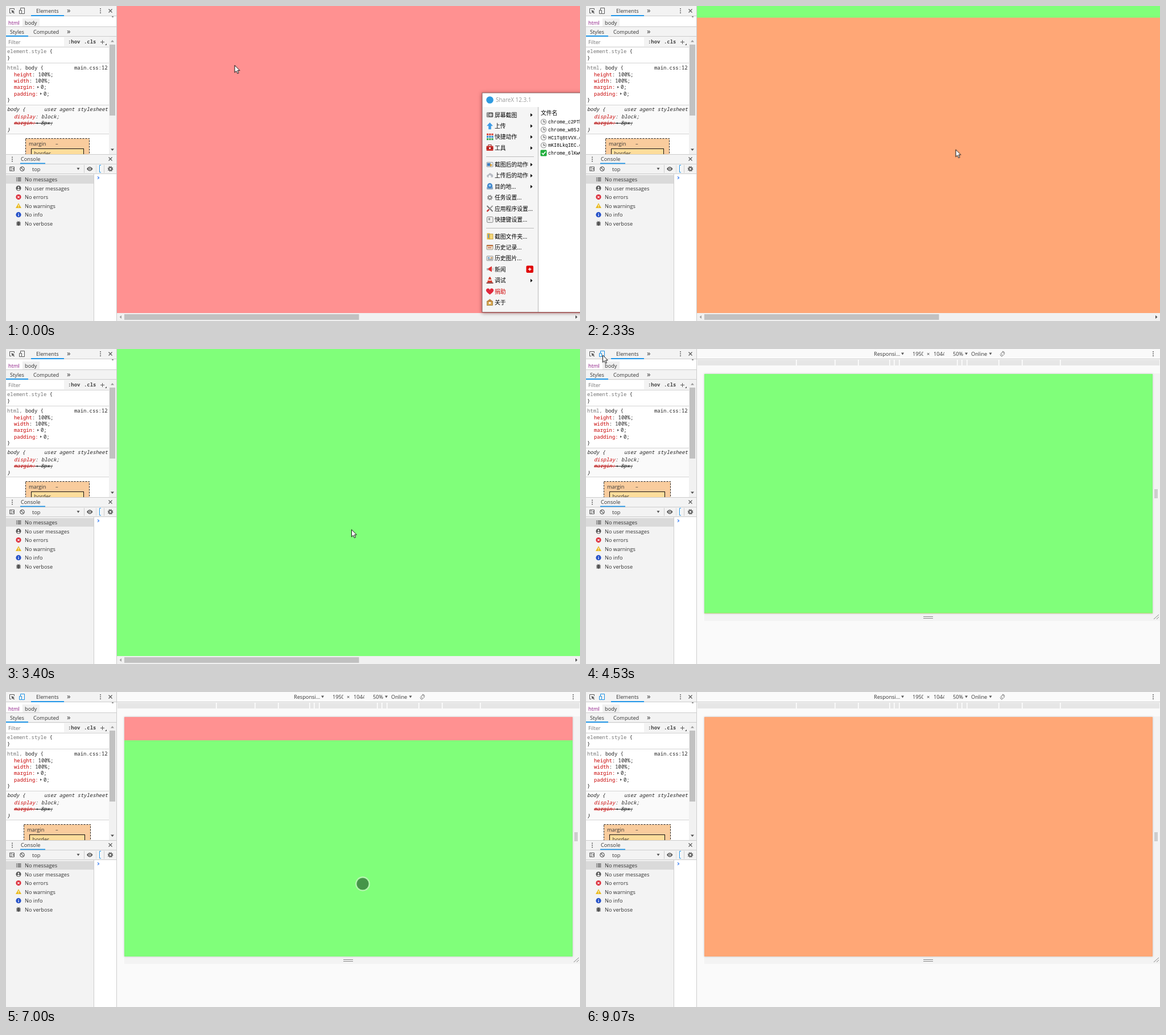
Write an HTML page that moves like this. It is 1009 by 555 pixels and loops after 9940 ms.

```html
<!DOCTYPE html>
<html lang="en">
<head>
<meta charset="utf-8">
<title>Page scroller demo</title>
<style>
html, body { margin: 0; width: 100%; height: 100%; overflow: hidden; background: #fff; }
#stage { position: relative; width: 1009px; height: 555px; overflow: hidden; }
#stage > svg { position: absolute; left: 0; top: 0; }
text { font: 9.2px "Open Sans", sans-serif; fill: #333; white-space: pre; }
.code text { font: 8.9px "Noto Sans Mono", monospace; fill: #222; }
.code .it { font-style: italic; }
.code .gray { fill: #777; }
.code .prop { fill: #c80000; }
.code .bold { font-weight: bold; fill: #444; }
.menu text { font: 9.8px "Noto Sans CJK SC", "Noto Sans CJK", sans-serif; fill: #000; }
.menu .file { font: 8.3px "Liberation Mono", monospace; }
.line { fill: none; stroke: #5a5a5a; }

/* Scrolling pages */
.view { position: absolute; overflow: hidden; animation: frame 9940ms step-end infinite; }
.strip { height: 300%; animation: scroll 9940ms infinite; }
.strip div { height: 33.3333%; }
@keyframes frame {
  0% { left: 195px; top: 0; width: 814px; height: 541px; box-shadow: none; }
  39.54%, 100% { left: 208px; top: 43.5px; width: 788px; height: 422.5px; box-shadow: 0 0 3px #bbb; }
}
@keyframes scroll {
  0%, 15.43% { transform: translateY(0); }
  19.46%, 20.44% { transform: translateY(-33.3333%); }
  24.46%, 28.17% { transform: translateY(-66.6667%); }
  32.19%, 55.41% { transform: translateY(-33.3333%); }
  59.44%, 61.87% { transform: translateY(-66.6667%); }
  65.9%, 70.01% { transform: translateY(-33.3333%); }
  74.04%, 76.06% { transform: translateY(0); }
  80.08%, 82.8% { transform: translateY(-33.3333%); }
  86.82%, 100% { transform: translateY(-66.6667%); }
}

/* Switches */
.desk, .device, #window, #arrow, #touch { animation: desk 9940ms step-end infinite; }
.device { animation-name: device; }
#window { animation-name: window; }
#arrow { animation-name: arrow; }
#touch { animation-name: touch; }
@keyframes desk { 0% { visibility: visible } 39.54%, 100% { visibility: hidden } }
@keyframes device { 0% { visibility: hidden } 39.54%, 100% { visibility: visible } }
@keyframes window { 0% { visibility: visible } 5.33%, 100% { visibility: hidden } }
@keyframes arrow {
  0% { visibility: visible } 46.96% { visibility: hidden }
  89.2% { visibility: visible } 91.15%, 100% { visibility: hidden }
}
@keyframes touch { 0% { visibility: hidden } 46.96% { visibility: visible } 89.2%, 100% { visibility: hidden } }

/* Pointer path */
#pointer { animation: pointer 9940ms linear infinite; }
@keyframes pointer {
  0%, .7% { transform: translate(401.5px, 104px); }
  6.04%, 10.06% { transform: translate(640px, 236px); }
  14% { transform: translate(655px, 246px); }
  16.1% { transform: translate(654.5px, 247px); }
  23.44% { transform: translate(649.5px, 252.5px); }
  30.18% { transform: translate(645px, 262px); }
  34.2% { transform: translate(607.5px, 318px); }
  39.24% { transform: translate(22px, 6px); }
  42.25%, 45.57% { transform: translate(24px, 8px); }
  50.3% { transform: translate(650px, 300px); }
  53.3% { transform: translate(656px, 330px); }
  56.34% { transform: translate(653px, 84px); }
  59.4% { transform: translate(650px, 90px); }
  62.5% { transform: translate(640px, 350px); }
  66.5% { transform: translate(634px, 120px); }
  70.42% { transform: translate(627px, 338px); }
  73.5% { transform: translate(630px, 355px); }
  76.8% { transform: translate(635px, 120px); }
  79.8% { transform: translate(632px, 360px); }
  83.2% { transform: translate(635px, 110px); }
  85.81% { transform: translate(600px, 300px); }
  91.05%, 100% { transform: translate(100px, 555px); }
}
</style>
</head>
<body>
<div id="stage">
  <svg id="base" width="1009" height="555"></svg>
  <div class="view"><div class="strip">
    <div style="background:#ff9191"></div>
    <div style="background:#80ff7a"></div>
    <div style="background:#ffa776"></div>
  </div></div>
  <svg width="1009" height="555">
    <g id="window" class="menu"></g>
    <g id="pointer">
      <path id="arrow" d="M.5 .5V13.2L3.4 10.5L5.4 15L7.5 14.1L5.5 9.7H9.4Z" fill="#fff" stroke="#111"/>
      <g id="touch">
        <circle r="11.7" fill="none" stroke="#d8f0d4" stroke-opacity=".6" stroke-width="2.4"/>
        <circle r="10.6" fill="#0a2a18" fill-opacity=".5"/>
      </g>
    </g>
  </svg>
</div>
<script>
const rect = (x, y, w, h, fill, more = '') =>
  `<rect x="${x}" y="${y}" width="${w}" height="${h}" fill="${fill}" ${more}/>`;
const text = (x, y, s, cls = '', more = '') => `<text x="${x}" y="${y}" class="${cls}" ${more}>${s}</text>`;
const path = (d, fill = '#5a5a5a') => `<path d="${d}" fill="${fill}"/>`;
const line = (d, color = '#5a5a5a', w = 1) => `<path d="${d}" class="line" style="stroke:${color};stroke-width:${w}"/>`;
const circle = (x, y, r, fill) => `<circle cx="${x}" cy="${y}" r="${r}" fill="${fill}"/>`;
const dots = (x, y) => [-3.5, 0, 3.5].map(d => circle(x, y + d, 1, '#5a5a5a')).join('');
const cross = (x, y) => line(`M${x - 3} ${y - 3}l6 6m0 -6l-6 6`, '#5a5a5a', 1.2);
const down = (x, y) => path(`M${x - 2.5} ${y - 2}h5l-2.5 4z`);
const gear = (x, y, color = '#5a5a5a') =>
  `<circle cx="${x}" cy="${y}" r="4" fill="none" stroke="${color}" stroke-width="1.6" stroke-dasharray="1.6 1.54"/>` +
  `<circle cx="${x}" cy="${y}" r="2.6" fill="none" stroke="${color}" stroke-width="1.8"/>`;
const phoneIcon = (color, cls) => `<g class="${cls}">${line('M25.5 7V3.5H32.5V13.5H28', color)}${line('M23.5 7.5h4v6h-4z', color)}</g>`;

function stylesPane() {
  const expander = (x, y) => path(`M${x} ${y - 5}l3.2 2l-3.2 2z`);
  const plain = (y, name, value, cls = '') =>
    text(14, y, `<tspan class="prop">${name}</tspan>: ${value};`, cls);
  const boxModel = (x, w, cls) => `<g class="${cls}">` +
    rect(x + .5, 233.5, w, 40, '#f9cc9d', 'stroke="#222" stroke-dasharray="3 2"') +
    rect(x + 10.5, 251.5, w - 20, 40, '#fddd9b', 'stroke="#111"') +
    text(x + 6, 246, 'margin') + text(87, 246, '–') + text(x + 15.5, 263, 'border') + '</g>';
  return rect(0, 72, 181, 190, '#fff') + rect(0, 175, 181, 51, '#fafafa') +
    [72, 100, 174, 225].map(y => rect(0, y, 181, 1, '#d4d4d4')).join('') +
    '<g class="code">' +
    text(109, 65.5, ':hov', 'bold') + text(137, 65.5, '.cls', 'bold') +
    text(2, 83, '<tspan class="gray">element.style</tspan> {') + text(2, 95, '}') +
    text(2, 111.5, '<tspan class="gray">html, </tspan>body {') + text(120, 111.5, 'main.css:12') +
    plain(123.5, 'height', '100%') + plain(134.7, 'width', '100%') +
    text(14, 146, 'margin:', 'prop') + expander(55, 146) + text(61, 146, '0;') +
    text(14, 157.5, 'padding:', 'prop') + expander(60, 157.5) + text(66, 157.5, '0;') + text(2, 169, '}') +
    text(2, 185, 'body {', 'it') + text(67, 185, 'user agent stylesheet', 'it') +
    plain(198, 'display', 'block', 'it') +
    text(14, 209, 'margin:', 'it prop') + expander(54, 209.5) + text(61, 209, '8px;', 'it') +
    line('M14 206.5H52', '#a00000') + line('M52 206.5H82', '#222') +
    text(2, 220.5, '}', 'it') + '</g>' +
    boxModel(34, 112, 'desk') + boxModel(31, 117, 'device') +
    rect(181, 54, 13, 208, '#f1f1f1') + rect(182, 68, 10, 125, '#c1c1c1') +
    path('M184 63.5h6l-3 -3.5z', '#999') + path('M184 251.5h6l-3 3.5z', '#505050');
}

function toolbars() {
  return rect(0, 0, 194, 18, '#f3f3f3') + rect(0, 18, 194, 19, '#fff') + rect(0, 37, 194, 35, '#f3f3f3') +
    rect(0, 17, 194, 1, '#ccc') + rect(0, 36, 194, 1, '#ccc') + rect(0, 53, 194, 1, '#ccc') +
    line('M9 12.5H6.5V4.5H14.5V7', '#5a5a5a') + path('M9.5 7l5.5 2.2l-2 .9l2 2.3l-1 1l-2.2 -2.2l-1 1.8z') +
    phoneIcon('#5a5a5a', 'desk') + phoneIcon('#1a8fe3', 'device') +
    text(53, 12, 'Elements') + rect(44, 16, 58, 2, '#2196e8') + text(107, 12, '»', '', 'style="font-size:13px"') +
    dots(166, 8.5) + cross(183.5, 8.5) + rect(186, 18.5, 3, 1, '#333') +
    rect(29, 22, 30, 14, '#f0f0f0') + text(4, 33, 'html', '', 'style="fill:#881280"') + text(33, 33, 'body') +
    text(7, 49, 'Styles') + rect(0, 52, 39, 2, '#2196e8') + text(48, 49, 'Computed') +
    text(107, 48.5, '»', '', 'style="font-size:13px"') +
    rect(0, 55, 102, 16, '#fff') + text(4, 67, 'Filter', '', 'style="fill:#777"') +
    line('M166 63.5h7M169.5 60v7') + path('M177 66v3h-3z');
}

function drawer() {
  const rows = ['messages', 'user messages', 'errors', 'warnings', 'info', 'verbose'];
  const icon = [
    y => line(`M18 ${y - 2.5}h1.5m1 0h6M18 ${y}h1.5m1 0h6M18 ${y + 2.5}h1.5m1 0h6`, '#5a5a5a', 1.3),
    y => circle(22, y, 4.5, '#555') + circle(22, y - 1.3, 1.4, '#f3f3f3') + path(`M19.2 ${y + 2.3}q2.8 -2.6 5.6 0q-2.8 2.4 -5.6 0z`, '#f3f3f3'),
    y => circle(22, y, 4.6, '#dc2f3c') + line(`M20.2 ${y - 1.8}l3.6 3.6m0 -3.6l-3.6 3.6`, '#fff', 1.1),
    y => path(`M22 ${y - 5}l5 8.8h-10z`, '#e9b91c') + rect(21.5, y - 2, 1.1, 3, '#fff') + rect(21.5, y + 1.7, 1.1, 1.1, '#fff'),
    y => circle(22, y, 4.6, '#2450c8') + rect(21.4, y - .5, 1.3, 3.2, '#fff') + rect(21.4, y - 2.6, 1.3, 1.3, '#fff'),
    y => rect(19.5, y - 3.5, 5, 7.5, '#555', 'rx="2.4"') + line(`M18 ${y - 2}h8M18 ${y + .3}h8M18 ${y + 2.6}h8M20 ${y - 4.5}l1 1m3 -1l-1 1`, '#555'),
  ];
  return rect(0, 261, 194, 35, '#f3f3f3') + rect(0, 261, 194, 1, '#ccc') + rect(0, 278, 194, 1, '#ccc') +
    dots(11, 270) + text(26, 273, 'Console') + rect(25, 276.5, 44, 1.7, '#2196e8') + cross(183.5, 269.5) +
    line('M6.5 283.5h8v7h-8zM9 283.5v7') + path('M13.5 285v4l-2.5 -2z') +
    line('M25.9 284.4l5.2 5.2M32.2 287a3.7 3.7 0 1 0 -7.4 0a3.7 3.7 0 1 0 7.4 0', '#5a5a5a', 1.2) +
    text(46, 291, 'top') + down(127, 287) + rect(137, 280, 1, 14, '#ccc') +
    path('M142 287q5 -7.5 10.5 0q-5.5 7.5 -10.5 0z') + circle(147.2, 287, 2.3, '#f3f3f3') + circle(147.2, 287, 1.2, '#5a5a5a') +
    rect(158, 280, 1, 14, '#ddd') + rect(164, 281, 3, 12, '#fff') + line('M167 280.5h-2.5v12.5h2.5', '#2196e8') +
    rect(172, 280, 1, 14, '#ccc') + gear(183.5, 287) +
    rect(0, 295, 194, 1, '#ccc') + rect(0, 296, 154, 259, '#f3f3f3') + rect(154, 296, 1, 259, '#ccc') +
    rect(155, 296, 39, 259, '#fff') + rect(0, 298, 154, 15, '#dadada') +
    rows.map((s, i) => icon[i](305.5 + i * 15.55) + text(33, 309 + i * 15.55, 'No ' + s)).join('') +
    line('M161 300.5l2.5 2.2l-2.5 2.2', '#367cf1', 1.2);
}

function deskChrome() {
  return '<g class="desk">' + rect(195, 541, 814, 14, '#f1f1f1') + rect(208, 543, 412.5, 10, '#c1c1c1') +
    path('M203 545v6l-3.5 -3z', '#a3a3a3') + path('M1001 545v6l3.5 -3z', '#505050') + '</g>';
}

function deviceChrome() {
  const gaps = [369, 437, 478, 533, 541, 550, 652, 660, 669, 725, 766, 833];
  return '<g class="device">' + rect(195, 0, 814, 555, '#fafafa') + rect(195, 17, 814, 1, '#ccc') +
    text(506, 12, 'Responsi...') + down(556.5, 8.5) +
    '<svg x="574" width="19" height="17">' + text(0, 12, '1950') + '</svg>' + text(599, 12, '×') +
    '<svg x="611" width="19" height="17">' + text(0, 12, '1044') + '</svg>' +
    text(645, 12, '50%') + down(668.5, 8.5) + text(677, 12, 'Online') + down(711, 8.5) +
    line('M729.2 8l3 -3l3.4 3.8l-3 3zM728 9.5a4.3 4.3 0 0 0 4 3.5M736 7.5a4.3 4.3 0 0 0 -4 -3.5', '#777') + dots(997, 8.5) +
    rect(196, 19, 812, 10, '#e6e6e6') + gaps.map(x => rect(x, 19, 1.5, 10, '#fff')).join('') +
    rect(996, 43, 13, 436, '#f3f3f3') + rect(208, 466, 801, 13, '#f3f3f3') +
    line('M1000.5 247v16M1003.5 247v16M593 471.5h17M593 474.5h17', '#888') +
    line('M998 476l9 -8M1003 476l4 -4', '#888') + '</g>';
}

function captureWindow() {
  const groups = [
    [195.5, ['屏幕截图', '上传', '快捷动作', '工具']],
    [283, ['截图后的动作', '上传后的动作', '目的地...', '任务设置...', '应用程序设置...', '快捷键设置...']],
    [409.5, ['截图文件夹...', '历史记录...', '历史图片...', '新闻', '调试', '捐助', '关于']],
  ];
  const box = (color, inner) => y => rect(845, y - 4, 11, 8, color, 'rx="1" stroke="#777" stroke-width=".7"') + inner(y);
  const cloud = y => path(`M846 ${y + 3}q-2.5 -4 2 -5q2 -4.5 5.5 -1q4 1.5 2.2 6z`, '#b8bcc4') + path(`M850.5 ${y - 1}l3 3h-2v3h-2v-3h-2z`, '#fff');
  const icons = [
    box('#555', y => rect(845, y - 4, 4, 8, '#999') + circle(852, y, 2.6, '#ccc')),
    y => path(`M850.5 ${y - 6}l5.5 6h-3.2v6h-4.6v-6h-3.2z`, '#3d9be6'),
    y => [0, 1, 2, 3, 4, 5, 6, 7, 8].map(i => rect(845 + i % 3 * 4.2, y - 6 + (i / 3 | 0) * 4.2, 3.2, 3.2, ['#d8463a', '#2f8ad0', '#3ca650'][(i / 3 | 0)])).join(''),
    y => rect(848, y - 5.5, 5, 3, 'none', 'stroke="#822"') + rect(844.5, y - 3.5, 12, 8.5, '#c8302b', 'rx="1"') + rect(844.5, y, 12, 1, '#701') + rect(849, y - 1, 3, 3, '#eee'),
    box('#dfe8f2', y => rect(846, y - 2.5, 6, 5, '#3d7fc0') + path(`M851 ${y - 2}l4 3l-4 3z`, '#e0a030')),
    cloud,
    y => rect(845, y, 11, 5, '#8fa8c4', 'rx="1.5"') + circle(850.5, y - 1.5, 4.6, '#3e86cc') + circle(850.5, y - 2, 2, '#a8d0f0'),
    y => gear(850.5, y, '#888'),
    y => line(`M845.5 ${y - 5}l10 10`, '#777', 2) + line(`M855.5 ${y - 5}l-10 10`, '#999', 2) + line(`M845.5 ${y + 5}l3.5 -3.5`, '#c33', 2.4),
    y => rect(845.5, y - 5, 10.5, 10, '#eee', 'rx="1.5" stroke="#888"') + rect(848, y - 3, 3, 4, '#999'),
    y => rect(845.5, y - 5.5, 5, 11, '#e8b93c') + rect(850, y - 4, 6, 9, '#f5d778', 'stroke="#b58a20" stroke-width=".7"') + rect(847, y - 4, 2, 7, '#6a9fd0'),
    box('#f2e3c8', y => rect(845, y - 4, 11, 2, '#c06a30') + rect(847, y, 6, 1.3, '#b55')),
    box('#e8e8e8', y => rect(847, y - 2, 3, 2, '#59c') + rect(852, y - 2, 3, 2, '#c95') + rect(847, y + 1, 8, 1.5, '#888')),
    y => path(`M845 ${y - 2}h3l6 -3.5v10l-6 -3.5h-3z`, '#d33') + rect(845, y - 2, 3, 3.5, '#aaa') + line(`M856 ${y - 3}v5`, '#999'),
    y => path(`M849.3 ${y - 6}h2.4l3.6 10h-9.6z`, '#d43b2c') + rect(847.5, y - 1.5, 6, 1.7, '#fff') + rect(844.5, y + 3.7, 12, 1.8, '#844'),
    y => path(`M850.5 ${y + 5.5}q-10 -7 -5 -10.5q3.5 -1.2 5 2q1.5 -3.2 5 -2q5 3.5 -5 10.5z`, '#e0283c'),
    y => rect(845.5, y - 2, 10, 7, '#d8a850', 'stroke="#8a6a2a" stroke-width=".7"') + path(`M844.5 ${y - 1.5}l6 -4.5l6 4.5z`, '#bb8440') + circle(850.5, y + 1, 1.8, '#fff'),
  ];
  const arrows = [0, 1, 2, 3, 4, 5, 6, 14];
  const files = ['chrome_c2PTh', 'chrome_w85Js', 'HC1Tq8tVVX.g', 'mKI8LkqIEC.g', 'chrome_6lKwC'];
  let n = 0;
  const items = groups.map(([top, names]) => names.map((s, i) => {
    const y = top + i * 19.42, id = n++;
    return icons[id](y - 3.7) + text(859, y, s, '', s === '捐助' ? 'style="fill:#d00000"' : '') +
      (arrows.includes(id) ? path(`M922 ${y - 6.5}v6l3.6 -3z`, '#000') : '');
  }).join('')).join('');
  const list = files.map((s, i) => {
    const y = 204 + i * 13.75;
    const mark = i < 4
      ? circle(945, y, 5.2, '#999') + circle(945, y, 4.2, '#eee') + line(`M945 ${y - 3}v3.3h3`, '#555')
      : rect(939.5, y - 5.5, 11, 11, '#1fae3c', 'rx="1.5"') + line(`M942 ${y}l2.3 2.5l4.2 -5`, '#fff', 1.8);
    return mark + text(953, y + 3, s, 'file');
  }).join('');
  return rect(837, 153, 180, 386.5, '#fff', 'stroke="#8a6565" style="filter:drop-shadow(0 1px 3px rgba(60,0,0,.5))"') +
    rect(838, 178, 97, 361, '#f5f5f5') + rect(935, 178, 1, 361, '#b8b8b8') +
    circle(850.5, 165.5, 6.3, '#2f9be0') +
    text(861, 169, 'ShareX 12.3.1', '', 'style="font:9.9px Open Sans,sans-serif;fill:#999"') +
    rect(844, 265, 84, 1, '#bdbdbd') + rect(844, 391, 84, 1, '#bdbdbd') + items +
    rect(914.5, 457.5, 12.5, 12.5, '#e00000', 'rx="2"') + line('M918 463.8h5.4M920.7 461.1v5.4', '#fff', 1.6) +
    text(940, 191.5, '文件名') + list;
}

document.getElementById('base').innerHTML =
  toolbars() + stylesPane() + drawer() + rect(194, 0, 1, 555, '#ccc') + deskChrome() + deviceChrome();
document.getElementById('window').innerHTML = captureWindow();

const LOOP = 9940, STEP = 1000 / 15;
const animations = document.getAnimations();
const start = performance.now();
animations.forEach(a => a.pause());

function tick() {
  const time = (performance.now() - start) % LOOP;
  const held = Math.floor((time + 4) / STEP) * STEP;
  animations.forEach(a => { a.currentTime = Math.min(held, LOOP - 1); });
  requestAnimationFrame(tick);
}
tick();
</script>
</body>
</html>
```
